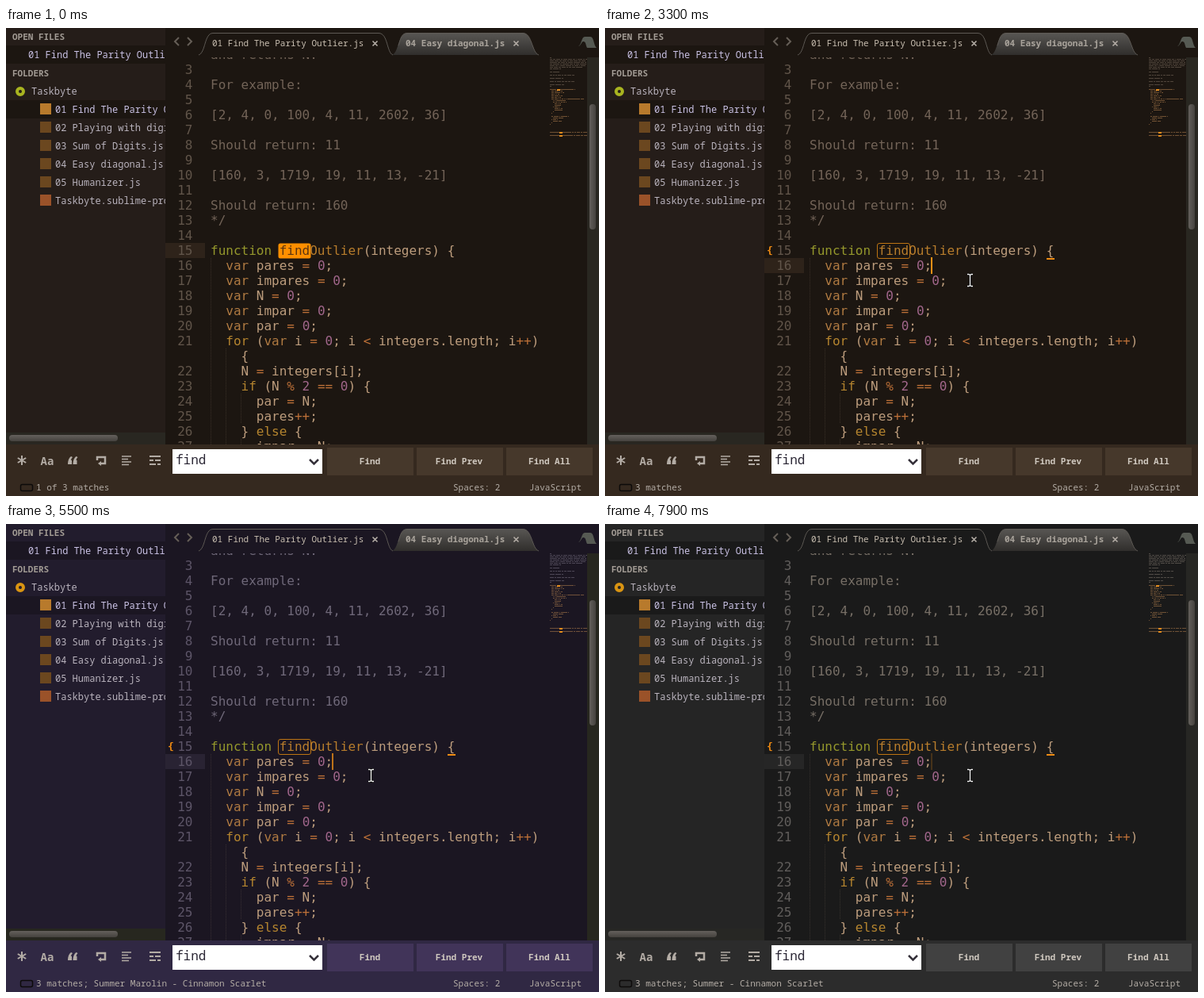
An HTML page for the animation above (8000 ms loop, 748 by 590 pixels).

```html
<!DOCTYPE html>
<html lang="en">
<head>
<meta charset="utf-8">
<title>Editor colour schemes</title>
<style>
html, body { margin: 0; width: 100%; height: 100%; overflow: hidden; background: #1a1612; }
svg { display: block; width: 748px; height: 590px; }
.brown  { --side: #251d19; --edit: #1c1611; --panel: #35291f; --btn: #46382b; --row: #2e231a; --note: #736458; --num: #61554a; --dot: #a9b420; --track: #292721; }
.purple { --side: #221c2d; --edit: #1b1622; --panel: #302843; --btn: #413459; --row: #292333; --note: #6f6879; --num: #5d5568; --dot: #d99412; --track: #27271f; }
.grey   { --side: #252525; --edit: #1a1a1a; --panel: #2c2c2c; --btn: #414141; --row: #262626; --note: #776f66; --num: #615e5c; --dot: #d99412; --track: #272724; }
text { white-space: pre; font-family: "Noto Sans Mono", "DejaVu Sans Mono", monospace; font-size: 11px; fill: #b3aca5; }
.code text { font-family: "DejaVu Sans Mono", monospace; font-size: 16px; fill: #bd9d7d; }
.code .note { fill: var(--note); }
.code .num { fill: var(--num); text-anchor: end; }
.side text { font-size: 12px; fill: #b9b3bd; }
.side .head { font-size: 11px; font-weight: 700; fill: #a39c95; }
.side .on { fill: #c9c1e4; }
.bold { font-weight: 600; }
.mid { text-anchor: middle; }
.fn { fill: #95982c; }
.name { fill: #b87d2c; }
.var { fill: #b17b42; }
.kw { fill: #b5852f; }
.val { fill: #a2678c; }
.op { fill: #bd7038; }
.icon { fill: none; stroke: #b3aca5; stroke-width: 2; }
</style>
</head>
<body>
<svg id="app" class="brown" viewBox="0 0 748 590">
  <defs>
    <linearGradient id="tab" x2="0" y2="1"><stop stop-color="#585653"/><stop offset="1" stop-color="#302e2c"/></linearGradient>
    <linearGradient id="thumbH" x2="0" y2="1"><stop stop-color="#64605c"/><stop offset="1" stop-color="#45423e"/></linearGradient>
    <linearGradient id="thumbV"><stop stop-color="#64605c"/><stop offset="1" stop-color="#45423e"/></linearGradient>
    <clipPath id="sideClip"><path d="M0 0H201V525H0z"/></clipPath>
    <clipPath id="codeClip"><path d="M201 37H733V525H201z"/></clipPath>
  </defs>
  <path d="M0 0H748V590H0z" fill="var(--edit)"/>

  <g class="side" clip-path="url(#sideClip)">
    <path d="M0 0H201V525H0z" fill="var(--side)"/>
    <path d="M0 22H201V45H0zM0 91H201V114H0z" fill="var(--edit)"/>
    <text class="head" x="8" y="15">OPEN FILES</text>
    <text class="on" x="28" y="38">01 Find The Parity Outlier.js</text>
    <text class="head" x="8" y="61">FOLDERS</text>
    <circle cx="18" cy="80" r="4" fill="none" stroke="var(--dot)" stroke-width="4"/>
    <text x="32" y="84">Taskbyte</text>
    <g id="files"></g>
    <path d="M0 510H201V525H0z" fill="var(--track)"/>
    <rect x="4" y="513" width="137" height="8" rx="4" fill="url(#thumbH)"/>
  </g>

  <path d="M487 34C496 31 494 6.500 506 6.500H652C664 6.500 663 31 672 34z" fill="url(#tab)"/>
  <path d="M243 34C252 31 250 6.500 261 6.500H470C482 6.500 480 31 488 34z" fill="var(--edit)"/>
  <path d="M243 34C252 31 250 6.500 261 6.500H470C482 6.500 480 31 488 34M495 22C498 13 499 6.500 506 6.500H652C664 6.500 663 31 672 34" fill="none" stroke="#5e5a55"/>
  <path d="M218 12l-5 5 5 5M229 12l5 5-5 5" class="icon" style="stroke:#655e57"/>
  <text x="260" y="23" style="fill:#c9bfb1">01 Find The Parity Outlier.js</text>
  <text x="504" y="23" class="bold" style="fill:#aaa49c">04 Easy diagonal.js</text>
  <path d="M462.500 16.500l6 6m0-6l-6 6M640.500 16.500l6 6m0-6l-6 6" class="icon" style="stroke-width:1.600"/>
  <path d="M722 23C726 21 726 11 730 11H737C742 11 741 22 745 25H733C731 22 732 17 728 17C726 17 725 23 722 23z" fill="#565a53"/>

  <g class="code" clip-path="url(#codeClip)">
    <rect id="row" x="201" y="271" width="50" height="19" fill="var(--row)"/>
    <path d="M258.500 290V525M277.500 404V525M296.500 461V499M296.500 518V525" stroke="#8a7a6a" stroke-opacity=".25" stroke-dasharray="1 1"/>
    <rect id="hit" x="343.500" y="271.500" width="41" height="19" rx="2.500"/>
    <g id="lines"></g>
    <g id="brace">
      <text x="204" y="285" style="font-size:13px;font-weight:700;fill:#ee8a12">{</text>
      <path d="M557 290H567V292H557z" fill="#f08c14"/>
    </g>
    <rect id="caret" x="411" y="289" width="2" height="21" fill="#f39016"/>
  </g>

  <g id="map"></g>
  <path d="M733 37H748V525H733z" fill="var(--track)"/>
  <rect x="736" y="96" width="8" height="158" rx="4" fill="url(#thumbV)"/>

  <path d="M0 525H748V590H0z" fill="var(--panel)"/>
  <path d="M405 529H514V564H405zM518 529H627V564H518zM631 529H740V564H631z" fill="var(--btn)"/>
  <path d="M210 531H399V562H210z" fill="#fff"/>
  <path d="M383 544l5.500 5.500 5.500-5.500" class="icon" style="stroke:#35313a;stroke-width:2.500"/>
  <text x="214" y="550" style="font-size:16px;fill:#2b2735">find</text>
  <g class="mid bold">
    <text x="459" y="550" style="fill:#d0c9c0">Find</text>
    <text x="571.500" y="550" style="fill:#d0c9c0">Find Prev</text>
    <text x="685.500" y="550" style="fill:#d0c9c0">Find All</text>
  </g>
  <path d="M20 539V551M14.800 542L25.200 548M14.800 548L25.200 542" class="icon"/>
  <text x="43.500" y="550.500" class="bold" style="font-size:14px">Aa</text>
  <path id="quote" d="M78 550q0-7 4-10l2 1q-2 2-2 4h1v5z" fill="#b3aca5"/>
  <use href="#quote" x="6.500"/>
  <path d="M115 545V541H125V549H119" class="icon" style="stroke-width:2.500"/>
  <path d="M116 549l4-3v6z" fill="#b3aca5"/>
  <path d="M146 540H158M146 543.500H154M146 547H158M146 550.500H155" class="icon" style="stroke-width:1.700"/>
  <path d="M181 540H195M181 545H186M188 545H195M181 550H189M191 550H195" class="icon"/>
  <rect x="18.500" y="575.500" width="15" height="8" rx="2" fill="none" stroke="#0d0b0a" stroke-width="1.500"/>
  <text id="status" x="38" y="583"></text>
  <text x="564" y="583">Spaces: 2</text>
  <text x="660" y="583">JavaScript</text>

  <g id="mouse" fill="none">
    <path id="beam" d="M-3.500-7.500H-1.500L0-6.500 1.500-7.500H3.500M0-6.500V6.500M-3.500 7.500H-1.500L0 6.500 1.500 7.500H3.500" stroke="#000" stroke-width="3"/>
    <use href="#beam" style="display:none"/>
    <path d="M-3.500-7.500H-1.500L0-6.500 1.500-7.500H3.500M0-6.500V6.500M-3.500 7.500H-1.500L0 6.500 1.500 7.500H3.500" stroke="#fff" stroke-width="1.300"/>
  </g>
</svg>
<script>
const $ = id => document.getElementById(id);
const clamp = v => Math.max(0, Math.min(1, v));
const escape = s => s.replace(/&/g, '&amp;').replace(/</g, '&lt;');

const files = ['01 Find The Parity Outlier.js', '02 Playing with digits.js', '03 Sum of Digits.js',
  '04 Easy diagonal.js', '05 Humanizer.js', 'Taskbyte.sublime-project'];
$('files').innerHTML = files.map((name, i) => {
  const y = 107 + 23 * i;
  const tint = i === 0 ? '#b87a2c' : i === 5 ? '#9a5229' : '#6b471f';
  return `<rect x="43" y="${y - 12}" width="14" height="14" fill="${tint}"/>
    <text x="62" y="${y}"${i ? '' : ' class="on"'}>${name}</text>`;
}).join('');

// A row starting with ">" continues the previous line and has no number.
const rows = `>and returns N.

For example:

[2, 4, 0, 100, 4, 11, 2602, 36]

Should return: 11

[160, 3, 1719, 19, 11, 13, -21]

Should return: 160
*/

function findOutlier(integers) {
  var pares = 0;
  var impares = 0;
  var N = 0;
  var impar = 0;
  var par = 0;
  for (var i = 0; i < integers.length; i++)
>    {
    N = integers[i];
    if (N % 2 == 0) {
      par = N;
      pares++;
    } else {
      impar = N;`.split('\n');

const kinds = [[/^function$/, 'fn'], [/^(find|Outlier)$/, 'name'], [/^var$/, 'var'],
  [/^(for|if|else)$/, 'kw'], [/^\d+$/, 'val'], [/^[=<%+]+$/, 'op']];
const paint = s => s.replace(/find|Outlier|\w+|[=<%+]+/g, word => {
  const kind = kinds.find(([test]) => test.test(word));
  const id = word === 'find' ? ' id="word"' : '';
  return kind ? `<tspan class="${kind[1]}"${id}>${escape(word)}</tspan>` : word;
});
let line = 2;
$('lines').innerHTML = rows.map((row, i) => {
  const y = 39 + 19 * i, wrapped = row[0] === '>';
  const text = wrapped ? row.slice(1) : row;
  if (!wrapped) line++;
  return (wrapped ? '' : `<text class="num" x="235.5" y="${y}">${line}</text>`) +
    (i < 12 ? `<text class="note" x="258" y="${y}">${escape(text)}</text>`
            : `<text x="258" y="${y}">${paint(text)}</text>`);
}).join('');

// Minimap: one small dash per word.
const intro = ['/*', 'You are given an array which has a length of at', 'least three but could be very large and holds',
  'integers. The array is either entirely made of', 'odd integers or entirely made of even integers',
  'except for a single integer N. Write a method', 'that takes the array as its only argument', 'and returns N.'];
const tail = ['      impares++;', '    }', '  }', '', '  if (pares > impares) {', '    return impar;',
  '  } else {', '    return par;', '  }', '}', '', '', '', '',
  'console.log(findOutlier([2, 4, 0, 100, 4, 11]))', '', 'console.log(findOutlier([160, 3, 1719, 19, 11]))'];
let map = '';
[...intro, ...rows.slice(1).filter(r => r[0] !== '>'), ...tail].forEach((row, i) => {
  for (const m of row.matchAll(/\S+/g))
    map += `<rect x="${686 + m.index}" y="${37 + 2 * i}" width="${Math.min(m[0].length, 47 - m.index)}" height="1" fill="${i < 20 ? 'var(--note)' : '#a8794a'}" opacity=".6"/>`;
});
$('map').innerHTML = map + '<path d="M695 77h4v2h-4zM698 131h4v2h-4zM698 135h4v2h-4z" fill="#e08a1c"/>';

const path = [[200, 673, 141], [300, 645, 188], [400, 582, 280], [500, 505, 347], [600, 442, 325], [700, 419, 305],
  [1300, 419, 305], [1600, 460.5, 320], [2000, 460.5, 320], [2200, 460.5, 318], [4000, 460.5, 318], [4100, 460.5, 317]];
function mouseAt(t) {
  const i = path.findIndex(p => p[0] > t);
  if (i < 0) return path.at(-1).slice(1);
  const [a, ...from] = path[i - 1], [b, ...to] = path[i];
  return from.map((v, k) => v + (to[k] - v) * (t - a) / (b - a));
}
function caretAt(t) {
  const phase = (t - 2460 + 1980) % 990;
  return phase < 430 ? clamp(1 - phase / 280) : clamp((phase - 430) / 300);
}

function draw(now) {
  const t = Math.floor(now % 8000 / 100) * 100;
  const clicked = t >= 1000;
  $('app').setAttribute('class', t < 3500 ? 'brown' : t < 6500 ? 'purple' : 'grey');
  $('status').textContent = !clicked ? '1 of 3 matches' : '3 matches' +
    (t < 3500 ? '' : t < 6500 ? '; Summer Marolin - Cinnamon Scarlet' : '; Summer - Cinnamon Scarlet');
  $('row').setAttribute('y', clicked ? 290 : 271);
  $('hit').style.cssText = clicked ? 'fill:none;stroke:#bd7413' : 'fill:#ff8f00';
  $('word').style.fill = clicked ? '' : '#5b3510';
  $('brace').style.opacity = t >= 1100 ? 1 : 0;
  $('caret').style.opacity = !clicked ? 0 : t < 1400 ? 1 : caretAt(t);
  $('mouse').style.opacity = t >= 200 ? 1 : 0;
  if (t >= 200) $('mouse').setAttribute('transform', `translate(${mouseAt(t)})`);
}
const start = performance.now();
(function tick() {
  draw(performance.now() - start);
  requestAnimationFrame(tick);
})();
</script>
</body>
</html>
```
